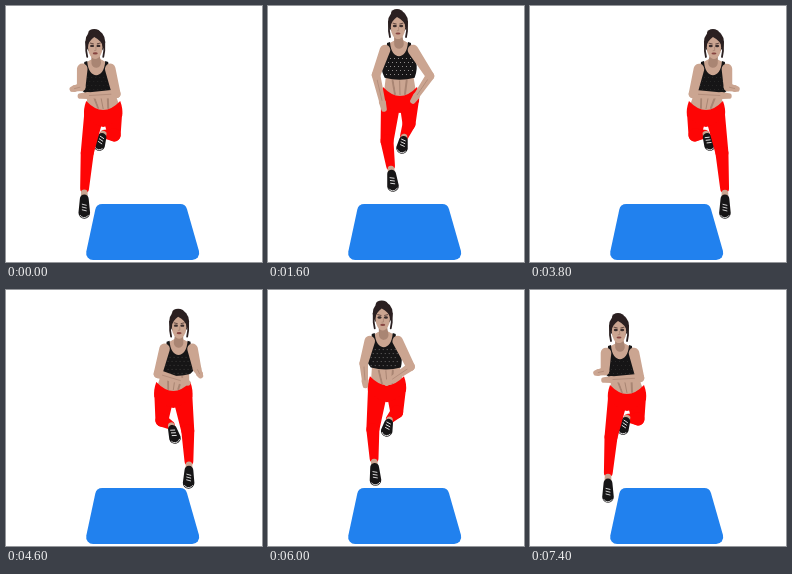
These frames come from a looping animation (256 by 256 pixels, 7600 ms). An HTML page with a canvas:

```html
<!DOCTYPE html>
<html lang="en">
<head>
<meta charset="utf-8">
<title>Side to side skater jump</title>
<style>
html, body { margin: 0; width: 100%; height: 100%; overflow: hidden; background: #fff; }
canvas { display: block; width: 100vw; height: 100vh; }
</style>
</head>
<body>
<canvas id="stage" width="256" height="256"></canvas>
<script>
const ctx = document.getElementById('stage').getContext('2d');
const STEP = 200, HALF = 19;   // ms per step, steps per crossing
const LANDED = 18.5, RISE = 8.5, AXIS = 136.5;
const SKIN = '#cba591', SHADE = '#a98573', HAIR = '#2b2021';
const RED = '#fe0505', BLACK = '#161516', MAT = '#2181ee';

const pt = (x, y) => ({ x, y });
const off = (a, dx, dy) => pt(a.x + dx, a.y + dy);
const mix = (a, b, k) => pt(a.x + (b.x - a.x) * k, a.y + (b.y - a.y) * k);
const clamp = (v, lo, hi) => Math.min(hi, Math.max(lo, v));

// L and R are sides as seen on screen
const landing = {
  head: pt(89, 38), neck: pt(90, 56), hip: pt(97, 106),
  elbowL: pt(75, 81), handL: pt(66, 83), elbowR: pt(110, 88), handR: pt(74, 90),
  kneeL: pt(81, 147), ankleL: pt(78, 187), toeL: pt(78, 207),
  kneeR: pt(108, 129), ankleR: pt(97, 128), toeR: pt(93, 139)
};
const flight = {
  head: pt(132, 18), neck: pt(133, 37), hip: pt(134, 92),
  elbowL: pt(110, 69), handL: pt(118, 103), elbowR: pt(164, 70), handR: pt(147, 95),
  kneeL: pt(121, 135), ankleL: pt(125, 163), toeL: pt(127, 180),
  kneeR: pt(143, 118), ankleR: pt(138, 131), toeR: pt(136, 142)
};

function mirror(pose) {
  const swap = { L: 'R', R: 'L' };
  return Object.fromEntries(Object.entries(pose).map(([name, p]) =>
    [name.replace(/[LR]$/, s => swap[s]), pt(2 * AXIS - p.x, p.y)]));
}
const landingRight = mirror(landing);

// Slow push off, fast flight, slow landing
function poseAt(p) {
  const fromGround = clamp(Math.min(p, LANDED - p), 0, RISE);
  const lift = (fromGround / RISE) ** 2.4;
  const drift = clamp(4 * (p - HALF / 2), -2, 2);
  const ground = p < HALF / 2 ? landing : landingRight;
  const pose = { lift };
  for (const name in flight) {
    pose[name] = mix(ground[name], off(flight[name], drift, 0), lift);
  }
  return pose;
}

function oval(x, y, rx, ry, color) {
  ctx.fillStyle = color;
  ctx.beginPath();
  ctx.ellipse(x, y, rx, ry, 0, 0, 7);
  ctx.fill();
}

function line(points, width, color) {
  ctx.strokeStyle = color;
  ctx.lineWidth = width;
  ctx.beginPath();
  points.forEach(p => ctx.lineTo(p.x, p.y));
  ctx.stroke();
}

// Tapered segment with round ends
function limb(a, b, ra, rb, color) {
  const angle = Math.atan2(b.y - a.y, b.x - a.x);
  ctx.fillStyle = color;
  ctx.beginPath();
  ctx.arc(a.x, a.y, ra, angle + Math.PI / 2, angle - Math.PI / 2);
  ctx.arc(b.x, b.y, rb, angle - Math.PI / 2, angle + Math.PI / 2);
  ctx.fill();
}

// Closed shape symmetric about x; draw(s) adds one half, s is the side
function drawMat() {
  const corners = [pt(90.5, 198), pt(179.5, 198), pt(195.5, 254), pt(78.5, 254)];
  ctx.fillStyle = MAT;
  ctx.beginPath();
  ctx.moveTo(135, 198);
  for (let i = 1; i <= 4; i++) {
    const a = corners[i % 4], b = corners[(i + 1) % 4];
    ctx.arcTo(a.x, a.y, b.x, b.y, 7);
  }
  ctx.fill();
}

function drawShoe(ankle, toe) {
  const heel = mix(ankle, toe, 0.3);
  limb(ankle, heel, 3.3, 3.5, SKIN);
  limb(heel, toe, 4.4, 5.8, BLACK);
  ctx.save();
  ctx.translate(toe.x, toe.y);
  ctx.rotate(Math.atan2(toe.y - ankle.y, toe.x - ankle.x));
  ctx.strokeStyle = '#e4e4e4';
  ctx.lineWidth = 0.9;
  ctx.beginPath();
  ctx.arc(0, 0, 4.8, -1, 1);
  for (let i = 0; i < 3; i++) {
    ctx.moveTo(-2 - i * 2.8, -2);
    ctx.lineTo(-3 - i * 2.8, 2);
  }
  ctx.stroke();
  ctx.restore();
}

function drawLeg(pose, side) {
  const sign = side === 'L' ? -1 : 1;
  const knee = pose['knee' + side], ankle = pose['ankle' + side];
  limb(off(pose.hip, sign * 9, 2), knee, 10, 6.5, RED);
  limb(knee, mix(knee, ankle, 0.9), 6.5, 4.4, RED);
  drawShoe(ankle, pose['toe' + side]);
}

function drawTorso({ neck: n, hip: h, lift }) {
  const hem = mix(n, h, 0.65);
  limb(off(n, 0, 9), hem, 12, 13, SKIN);
  [-1, 1].forEach(s => {
    limb(off(n, s * 3, 0), off(n, s * 12, 7), 3, 5, SKIN);
    limb(off(hem, s * 4, 0), off(h, s * 6, -5), 10, 10, SKIN);
    line([off(hem, s * 7, 2), off(h, s * 5, -4)], 2, SHADE);
  });
  line([off(hem, 0, 2), off(h, 0, -3)], 1, SHADE);

  ctx.fillStyle = RED;
  ctx.beginPath();
  ctx.moveTo(h.x - 17, h.y - 11);
  ctx.quadraticCurveTo(h.x, h.y + 7, h.x + 17, h.y - 11);
  ctx.quadraticCurveTo(h.x + 20, h.y - 3, h.x + 19, h.y + 4);
  ctx.quadraticCurveTo(h.x + 8, h.y + 14, h.x, h.y + 15);
  ctx.quadraticCurveTo(h.x - 8, h.y + 14, h.x - 19, h.y + 4);
  ctx.quadraticCurveTo(h.x - 20, h.y - 3, h.x - 17, h.y - 11);
  ctx.fill();

  ctx.fillStyle = BLACK;
  ctx.beginPath();
  ctx.moveTo(n.x - 12, n.y);
  ctx.lineTo(n.x - 9, n.y - 1);
  ctx.bezierCurveTo(n.x - 8, n.y + 18, n.x + 8, n.y + 18, n.x + 9, n.y - 1);
  ctx.lineTo(n.x + 12, n.y);
  ctx.quadraticCurveTo(n.x + 11, n.y + 10, n.x + 17, n.y + 18);
  ctx.quadraticCurveTo(n.x + 19, n.y + 26, hem.x + 15, hem.y - 1);
  ctx.quadraticCurveTo(hem.x, hem.y + 3, hem.x - 15, hem.y - 1);
  ctx.quadraticCurveTo(n.x - 19, n.y + 26, n.x - 17, n.y + 18);
  ctx.quadraticCurveTo(n.x - 11, n.y + 10, n.x - 12, n.y);
  ctx.fill();

  ctx.fillStyle = `rgba(225, 220, 218, ${0.1 + 0.5 * lift})`;
  for (let row = 0; row < 5; row++) {
    for (let col = -3; col <= 3; col++) {
      ctx.fillRect(n.x + col * 4 + (row % 2) * 2 - 1, n.y + 15 + row * 4, 1, 1);
    }
  }
}

function drawArm(pose, side) {
  const sign = side === 'L' ? -1 : 1;
  const elbow = pose['elbow' + side], hand = pose['hand' + side];
  const wrist = mix(elbow, hand, 0.8);
  limb(off(pose.neck, sign * 14, 7), elbow, 5.3, 4.3, SKIN);
  limb(elbow, wrist, 4.3, 3, SKIN);
  limb(wrist, hand, 3.5, 2.8, SKIN);
  line([mix(elbow, hand, 0.15), mix(elbow, hand, 0.75)], 0.7, SHADE);
}

function drawHead({ head, neck }) {
  const { x, y } = head;
  oval(x - 1, y - 11, 6, 4, HAIR);
  oval(x, y - 2, 10, 11.8, HAIR);
  limb(off(head, 0, 10), off(neck, 0, 1), 4, 4.8, SHADE);
  oval(x, y + 3.5, 7.2, 11.5, SKIN);
  ctx.fillStyle = HAIR;
  ctx.beginPath();
  ctx.moveTo(x - 9, y + 5);
  ctx.quadraticCurveTo(x - 6, y - 4, x - 1, y - 7);
  ctx.quadraticCurveTo(x + 6, y - 4, x + 9, y + 5);
  ctx.quadraticCurveTo(x + 10, y - 11, x, y - 12);
  ctx.quadraticCurveTo(x - 10, y - 11, x - 9, y + 5);
  ctx.fill();
  [-1, 1].forEach(s => {
    line([off(head, s * 9, -2), off(head, s * 9, 7), off(head, s * 8, 13)], 1.8, HAIR);
    line([off(head, s * 1.7, 0), off(head, s * 5, -0.8)], 0.9, '#58403a');
    oval(x + s * 3.2, y + 2, 2, 1.2, '#3b2d2c');
  });
  line([off(head, 0.6, 3), off(head, 0.8, 6.5), off(head, -0.8, 6.7)], 0.8, SHADE);
  oval(x, y + 9.5, 2.5, 1.1, '#864541');
}

function drawWoman(p) {
  const pose = poseAt(p);
  const [back, front] = p < 12 ? ['R', 'L'] : ['L', 'R'];
  drawLeg(pose, back);
  drawLeg(pose, front);
  drawTorso(pose);
  drawArm(pose, front);
  drawArm(pose, back);
  drawHead(pose);
}

// The crossing plays forwards, then backwards
function draw(time) {
  const n = (Math.floor(time / STEP) + 1) % (2 * HALF);
  ctx.fillStyle = '#fff';
  ctx.fillRect(0, 0, 256, 256);
  drawMat();
  drawWoman(Math.min(n, 2 * HALF - n));
}

let start;
function tick(now) {
  start ??= now;
  draw(now - start);
  requestAnimationFrame(tick);
}

ctx.lineCap = ctx.lineJoin = 'round';
draw(0);
requestAnimationFrame(tick);
</script>
</body>
</html>
```
